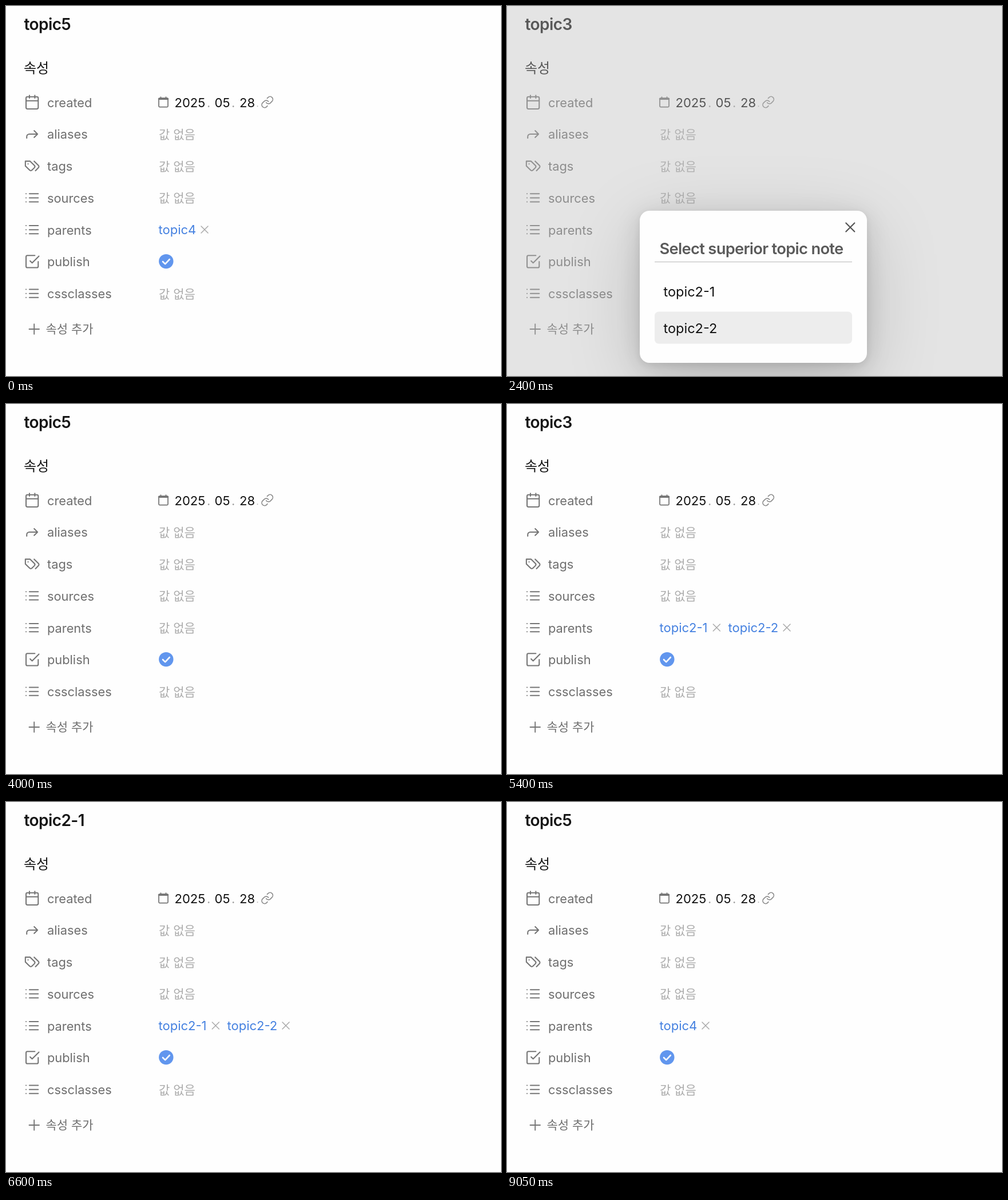
An HTML page that plays this animation: 865x647 px, repeating every 9.1 s.

```html
<!DOCTYPE html>
<html lang="ko">
<head>
<meta charset="utf-8">
<style>
  html, body { margin: 0; width: 100%; height: 100%; overflow: hidden; background: #fefefe; }
  body { position: relative; }
  svg { display: block; position: absolute; left: 0; top: 0; overflow: visible; }
  text { font: 21.8px Inter, "Noto Sans CJK KR", sans-serif; fill: #6e6e6e; white-space: pre; }
  path, .line { fill: none; stroke: #757575; stroke-width: 1.75; stroke-linecap: round; stroke-linejoin: round; }
  .title { font-size: 28px; font-weight: 600; letter-spacing: -.02em; fill: #161616; }
  .heading { font-size: 24px; font-weight: 500; fill: #161616; }
  .korean { font-size: 21px; }
  .empty { font-size: 21px; fill: #acacac; }
  .date { font-size: 22px; fill: #111; }
  .dot { fill: #9c9c9c; }
  .link { font-size: 22px; fill: #4480e0; }
  .remove { stroke: #a9a9a9; stroke-width: 1.5; }
  #cover { position: absolute; inset: 0; background: rgba(187, 187, 187, .4); }
  #modal {
    position: absolute; left: 232px; top: 358px; width: 397px; height: 266px;
    border-radius: 17px; background: #fefefe;
    box-shadow: 0 3px 12px rgba(0, 0, 0, .07), 0 10px 44px rgba(0, 0, 0, .13), 0 30px 130px rgba(0, 0, 0, .17);
  }
  #modal .title { font-size: 27.3px; letter-spacing: -.025em; fill: #5a5a5a; }
  #modal .item { font-size: 23.5px; fill: #111; }
</style>
</head>
<body>
<svg width="865" height="647">
  <text id="title" class="title" x="31.5" y="41.5"></text>
  <text class="heading" x="31" y="117">속성</text>
  <g id="rows"></g>

  <rect class="line" x="267" y="161" width="16" height="15.5" rx="1.5"/>
  <path d="M267.5 162.3h15" style="stroke-width:3.2"/>
  <path d="M270.5 159v2M279.5 159v2"/>
  <text class="date" y="176.5"><tspan x="294.5">2025</tspan><tspan x="364.5">05</tspan><tspan x="408">28</tspan></text>
  <text class="dot" y="176.5"><tspan x="351">.</tspan><tspan x="394">.</tspan></text>
  <circle cx="439.5" cy="175.3" r="1" fill="#b4b4b4"/>
  <path style="stroke:#8c8c8c" transform="translate(445 156.4) scale(.97)"
    d="M10 13a5 5 0 0 0 7.54.54l3-3a5 5 0 0 0-7.07-7.07l-1.72 1.71M14 11a5 5 0 0 0-7.54-.54l-3 3a5 5 0 0 0 7.07 7.07l1.71-1.71"/>

  <g id="parents"></g>

  <circle cx="279.8" cy="446.6" r="12.7" fill="#6196ee"/>
  <path d="M274 447l4.2 4.2 7.6-8.2" style="stroke:#fff;stroke-width:2.6"/>

  <path d="M40.5 565h17.5M49.2 556.2v17.5" style="stroke-width:1.9"/>
  <text class="korean" x="69.5" y="572">속성 추가</text>
</svg>

<div id="cover"></div>
<div id="modal">
  <svg width="397" height="266" viewBox="232 358 397 266">
    <path d="M592.3 379.5l15 15m0-15l-15 15" style="stroke:#555;stroke-width:2.2"/>
    <text class="title" x="266.5" y="434">Select superior topic note</text>
    <rect x="258" y="447" width="345" height="1" fill="#b8b8b8"/>
    <rect id="choice" x="258" width="345" height="56" rx="7" fill="#ededed"/>
    <text class="item" x="273.5" y="508">topic2-1</text>
    <text class="item" x="273.5" y="571.5">topic2-2</text>
  </svg>
</div>

<script>
const LOOP = 9100, ROW_TOP = 168, ROW_STEP = 55.75, PARENT_DELAY = 50;
const $ = id => document.getElementById(id);

const icons = {
  calendar: 'M8 2v4M16 2v4M5 4h14a2 2 0 0 1 2 2v14a2 2 0 0 1-2 2H5a2 2 0 0 1-2-2V6a2 2 0 0 1 2-2zM3 10h18',
  forward: 'M15 17l5-5-5-5M4 18v-2a4 4 0 0 1 4-4h12',
  tags: 'M9 5H2v7l6.29 6.29c.94.94 2.48.94 3.42 0l3.58-3.58c.94-.94.94-2.48 0-3.42L9 5ZM6 9.01V9M15 5l6.3 6.3a2.4 2.4 0 0 1 0 3.4L17 19',
  list: 'M8 6h13M8 12h13M8 18h13M3 6h.01M3 12h.01M3 18h.01',
  check: 'M9 11l3 3L22 4M21 12v7a2 2 0 0 1-2 2H5a2 2 0 0 1-2-2V5a2 2 0 0 1 2-2h11'
};

const properties = [
  ['created', 'calendar'], ['aliases', 'forward', true], ['tags', 'tags', true],
  ['sources', 'list', true], ['parents', 'list'], ['publish', 'check'], ['cssclasses', 'list', true]
];

const emptyValue = y => `<text class="empty" x="267" y="${y + 8}">값 없음</text>`;

$('rows').innerHTML = properties.map(([name, icon, empty], i) => {
  const y = ROW_TOP + i * ROW_STEP;
  return `<path transform="translate(31.5 ${y - 14}) scale(1.18)" d="${icons[icon]}"/>
    <text x="72" y="${y + 8.5}">${name}</text>${empty ? emptyValue(y) : ''}`;
}).join('');

// A parent link: name, left edge, centre of its remove cross
const link = (name, x, cross) =>
  `<text class="link" x="${x}" y="398.5">${name}</text>
   <path class="remove" d="M${cross - 6} 385l12 12m0-12l-12 12"/>`;

const root = link('topic1', 266.5, 345);
const parents = {
  'topic5': link('topic4', 266.5, 347),
  'topic4': link('topic3', 266.5, 347),
  'topic3': link('topic2-1', 266.5, 366.3) + link('topic2-2', 386.5, 489),
  'topic2-1': root,
  'topic2-2': root,
  'topic1': emptyValue(390.5)
};

const visits = [
  [0, 'topic5'], [400, 'topic4'], [950, 'topic3'], [2500, 'topic2-2'], [3300, 'topic1'],
  [4000, 'topic5'], [4700, 'topic4'], [5250, 'topic3'], [6600, 'topic2-1'], [7150, 'topic1'],
  [8100, 'topic5']
];
const noteAt = t => visits.findLast(([start]) => start <= Math.max(t, 0))[1];
const between = (t, a, b) => t >= a && t < b;

let shownParents;
function draw(now) {
  const t = now % LOOP;
  $('title').textContent = noteAt(t);

  const note = noteAt(t - PARENT_DELAY);
  if (note !== shownParents) $('parents').innerHTML = parents[shownParents = note];

  const open = between(t, 1350, 2500) || between(t, 5950, 6600);
  $('cover').hidden = $('modal').hidden = !open;
  $('choice').setAttribute('y', between(t, 2050, 2500) ? 534.5 : 472);
  requestAnimationFrame(draw);
}
draw(0);
</script>
</body>
</html>
```
